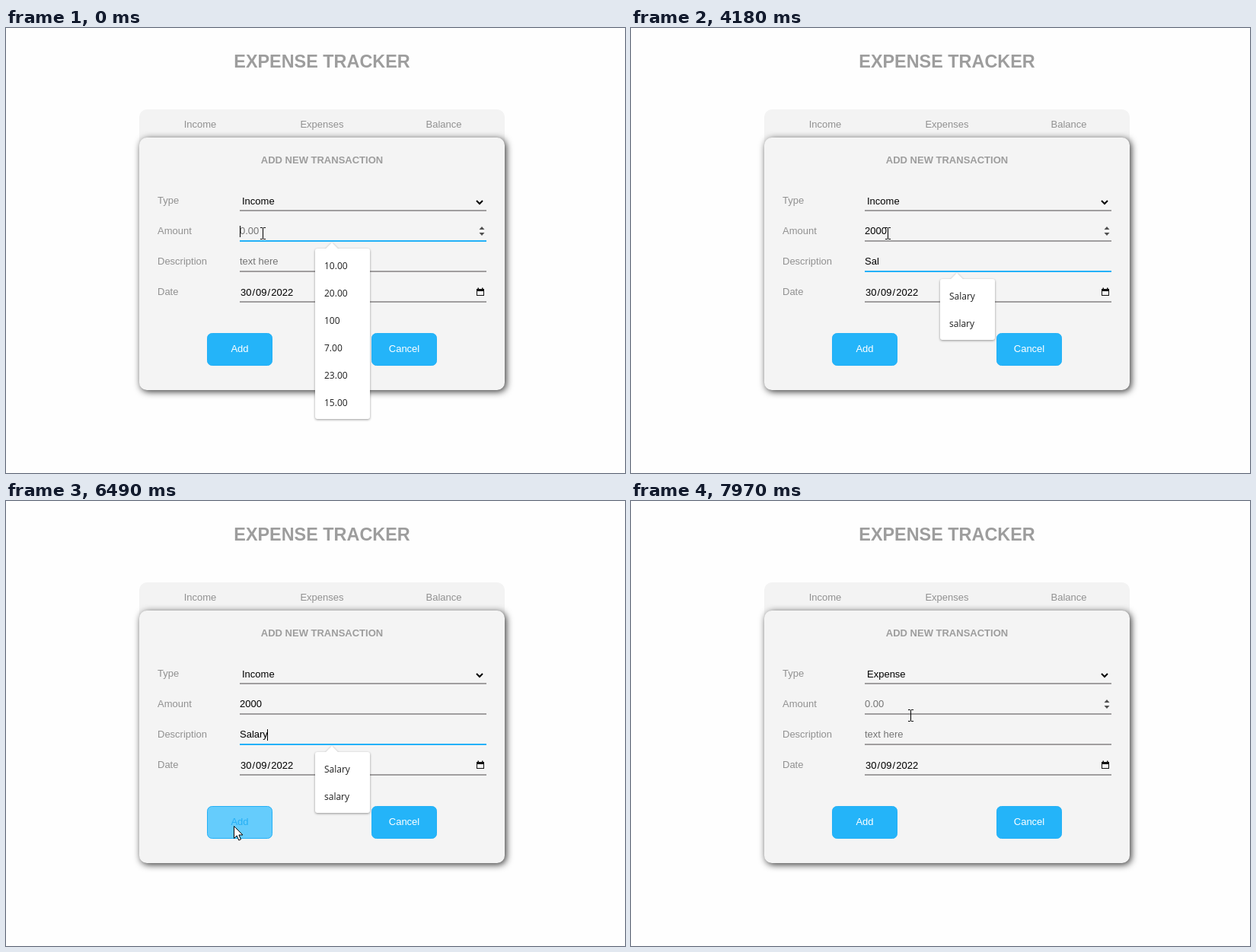
These frames come from a looping animation (813x585 px, 8000 ms). An HTML page:

```html
<!DOCTYPE html>
<html lang="en">
<head>
<meta charset="utf-8">
<title>Expense tracker</title>
<style>
  html, body { margin: 0; width: 100%; height: 100%; overflow: hidden; background: #fefefe; }
  svg { display: block; font: 13px "Liberation Sans", Arial, sans-serif; }
  text { white-space: pre; }
  .mid { text-anchor: middle; }
  .bold { font-weight: bold; }
  .label { fill: #919191; }
  .head { fill: #9d9d9d; }
  .sum { fill: #24b1f8; font-size: 26px; }
  .dark { fill: #505050; }
  .hint { fill: #757575; }
  .line { fill: #a09e9f; }
  .menu text { font: 12px "Open Sans", "Noto Sans", sans-serif; fill: #202020; }
  .modal { filter: drop-shadow(2px 2px 5px #333); }
  .popup { filter: drop-shadow(0 1px 1.5px rgba(0, 0, 0, .4)); }
</style>
</head>
<body>
<svg id="stage" width="813" height="585" viewBox="0 0 813 585">
  <text class="head bold mid" x="415" y="52" font-size="23.4">EXPENSE TRACKER</text>
  <rect x="175" y="107" width="480" height="80" rx="10" fill="#f3f3f3"/>
  <text class="label mid" x="255" y="131">Income</text>
  <text class="label mid" x="415" y="131">Expenses</text>
  <text class="label mid" x="575" y="131">Balance</text>

  <g id="list">
    <text class="sum bold mid" x="255" y="172">$2000.00</text>
    <text class="sum bold mid" x="415" y="172">$0.00</text>
    <text class="sum bold mid" x="575" y="172">$2000.00</text>
    <g id="newBtn"></g>
    <g id="delBtn"></g>
    <text class="dark bold" x="175" y="311">Transaction History</text>
    <text class="hint" x="463" y="310">search</text>
    <rect class="line" x="463" y="317" width="192" height="2"/>
    <rect x="175" y="336" width="480" height="53" fill="#f3f3f3"/>
    <text class="dark" x="184" y="366">2022-09-30</text>
    <text class="dark" x="300" y="366">Salary</text>
    <text class="dark" x="530" y="366">$2000</text>
    <g fill="none" stroke="#555" stroke-width="2" stroke-linecap="round" stroke-linejoin="round">
      <path d="M604.5 348.5H629.5M606.5 349l2 22.5q.3 2.5 2.5 2.5h12q2.200 0 2.500-2.500l2-22.500M611.500 348q1.500-4.500 5.500-4.500t5.500 4.500"/>
      <path d="M611.500 354l1 13.500M617 354v13.500M622.500 354l-1 13.500"/>
    </g>
  </g>

  <g id="modal">
    <rect class="modal" x="175" y="144" width="480" height="332" rx="10" fill="#f4f4f4"/>
    <text class="head bold mid" x="415" y="178">ADD NEW TRANSACTION</text>
    <text class="label" x="199" y="231">Type</text>
    <text class="label" x="199" y="271">Amount</text>
    <text class="label" x="199" y="311">Description</text>
    <text class="label" x="199" y="351">Date</text>
    <rect class="line" x="307" y="239" width="324" height="2"/>
    <rect id="amountLine" x="307" y="279" width="324" height="2"/>
    <rect id="descLine" x="307" y="319" width="324" height="2"/>
    <rect class="line" x="307" y="359" width="324" height="2"/>
    <text id="type" x="310" y="232"></text>
    <path d="M618 227l4 4 4-4" fill="none" stroke="#000" stroke-width="2"/>
    <text id="amount" x="307" y="271"></text>
    <path id="spin" d="M621.500 265l3.500-4 3.500 4zM621.500 269l3.500 4 3.500-4z" fill="#505050"/>
    <text id="desc" x="307" y="311"></text>
    <text x="308" y="352" dx="0 0 1 1 0 1 1">30/09/2022</text>
    <path d="M618 343h1.500v-1.500h1.500v1.500h4v-1.500h1.500v1.500h1.500v9h-10zM619 346v5h8v-5z" fill="#111" fill-rule="evenodd"/>
    <g id="addBtn"></g>
    <g id="cancelBtn"></g>
    <rect id="caret" width="1" height="15"/>
    <g id="popup" class="menu"></g>
  </g>

  <g id="pointer">
    <path id="arrow" d="M.5.500v16l3.700-3.500 2.600 6 2.700-1.200-2.600-5.800h5z" fill="#fff" stroke="#000"/>
    <path id="beam" d="M-3-7.500h3m1 0h3M-3 7.500h3m1 0h3M.5-7v14" fill="none" stroke="#000"/>
  </g>
</svg>
<script>
const LOOP = 8000;
const BLUE = [36, 180, 249], PALE = [112, 208, 252];
const $ = id => document.getElementById(id);
const show = (id, on) => { $(id).style.display = on ? "" : "none"; };

const buttons = {
  newBtn: [199, 225, 160, 32, 0, "Add new transactions"],
  delBtn: [467, 225, 164, 32, 0, "Delete all transactions"],
  addBtn: [264, 401, 86, 43, 6, "Add"],
  cancelBtn: [480, 401, 86, 43, 6, "Cancel"]
};

for (const [id, [x, y, w, h, r, label]] of Object.entries(buttons)) {
  $(id).innerHTML =
    `<rect x="${x + .5}" y="${y + .5}" width="${w - 1}" height="${h - 1}" rx="${r}" stroke="#24b0f6"/>` +
    `<text class="mid" x="${x + w / 2}" y="${y + (h > 40 ? 25 : 20)}">${label}</text>`;
}

const start = {
  modal: true, type: "Income", amount: "", desc: "", focus: "amount", caret: true,
  menu: ["10.00", "20.00", "100", "7.00", "23.00", "15.00"],
  at: [337, 270], beam: true, spin: true,
  over: "", fade: {}
};

// Each step changes only the listed properties.
const steps = [
  [0, {}],
  [250, { caret: false }],
  [640, { caret: true, amount: "2", menu: ["20.00", "23.00"] }],
  [760, { amount: "20", menu: ["20.00"] }],
  [1010, { amount: "200", menu: [] }],
  [1130, { amount: "2000" }],
  [1630, { focus: "desc" }],
  [2140, { caret: false }],
  [2280, { caret: true, desc: "S", menu: ["Salary", "salary"] }],
  [2400, { desc: "Sa" }],
  [2520, { desc: "Sal" }],
  [3050, { caret: false }],
  [3680, { caret: true }],
  [4180, { caret: false }],
  [4700, { caret: true }],
  [4820, { desc: "Sala" }],
  [5360, { desc: "Salary" }],
  [5750, { at: [336, 309], spin: false }],
  [5870, { at: [331, 410], beam: false }],
  [5990, { at: [324, 487] }],
  [6110, { at: [314, 478] }],
  [6250, { at: [303, 449] }],
  [6370, { at: [299, 427], over: "addBtn", fade: { addBtn: .35 } }],
  [6490, { fade: { addBtn: .85 } }],
  [6610, { modal: false, over: "", fade: {} }],
  [6990, { at: [390, 338] }],
  [7110, { at: [491, 246], over: "delBtn" }],
  [7250, { at: [495, 242], fade: { delBtn: .85 } }],
  [7370, { at: [440, 241], over: "", fade: { delBtn: .95 } }],
  [7490, { at: [350, 239], over: "newBtn", fade: { delBtn: .8, newBtn: .25 } }],
  [7610, { at: [321, 237], fade: { delBtn: .4, newBtn: .92 } }],
  [7730, { fade: { newBtn: 1 } }],
  [7850, { modal: true, type: "Expense", amount: "", desc: "", focus: "", menu: [],
           at: [345, 258], beam: true, spin: true, over: "", fade: {} }],
  [7970, { at: [367, 282] }]
];

function field(id, value, hint, focused) {
  $(id).textContent = value || hint;
  $(id).setAttribute("fill", value ? "#000" : "#757575");
  $(id + "Line").setAttribute("fill", focused ? "#24b1f8" : "#a09e9f");
}

function drawMenu(items, top) {
  const bottom = top + items.length * 36 + 8;
  const box = `M409 ${top}H420l8-8 8 8H475q3 0 3 3V${bottom - 3}q0 3-3 3H409q-3 0-3-3V${top + 3}q0-3 3-3z`;
  $("popup").innerHTML = items.length ? `<path class="popup" d="${box}" fill="#fff"/>` +
    items.map((s, i) => `<text x="418" y="${top + 27 + i * 36}">${s}</text>`).join("") : "";
}

function draw(s) {
  show("modal", s.modal);
  show("list", !s.modal);
  show("spin", s.spin);
  show("arrow", !s.beam);
  show("beam", s.beam);
  show("caret", s.caret && s.focus);
  $("type").textContent = s.type;
  field("amount", s.amount, "0.00", s.focus === "amount");
  field("desc", s.desc, "text here", s.focus === "desc");
  drawMenu(s.menu, s.focus === "desc" ? 330 : 290);
  if (s.modal && s.focus) {
    const width = s[s.focus] ? $(s.focus).getComputedTextLength() : 0;
    $("caret").setAttribute("x", Math.floor(307 + width));
    $("caret").setAttribute("y", s.focus === "desc" ? 300 : 260);
  }
  for (const id in buttons) {
    const k = s.fade[id] || 0;
    const [box, label] = $(id).children;
    box.setAttribute("fill", `rgb(${BLUE.map((c, i) => Math.round(c + (PALE[i] - c) * k))})`);
    label.setAttribute("fill", s.over === id ? "#24aff5" : "#fff");
  }
  $("pointer").setAttribute("transform", `translate(${s.at})`);
}

let last = -1;
function tick() {
  const t = performance.now() % LOOP;
  const n = steps.filter(([at]) => at <= t).length;
  if (n !== last) {
    draw(Object.assign({}, start, ...steps.slice(0, n).map(step => step[1])));
    last = n;
  }
  requestAnimationFrame(tick);
}
tick();
</script>
</body>
</html>
```
